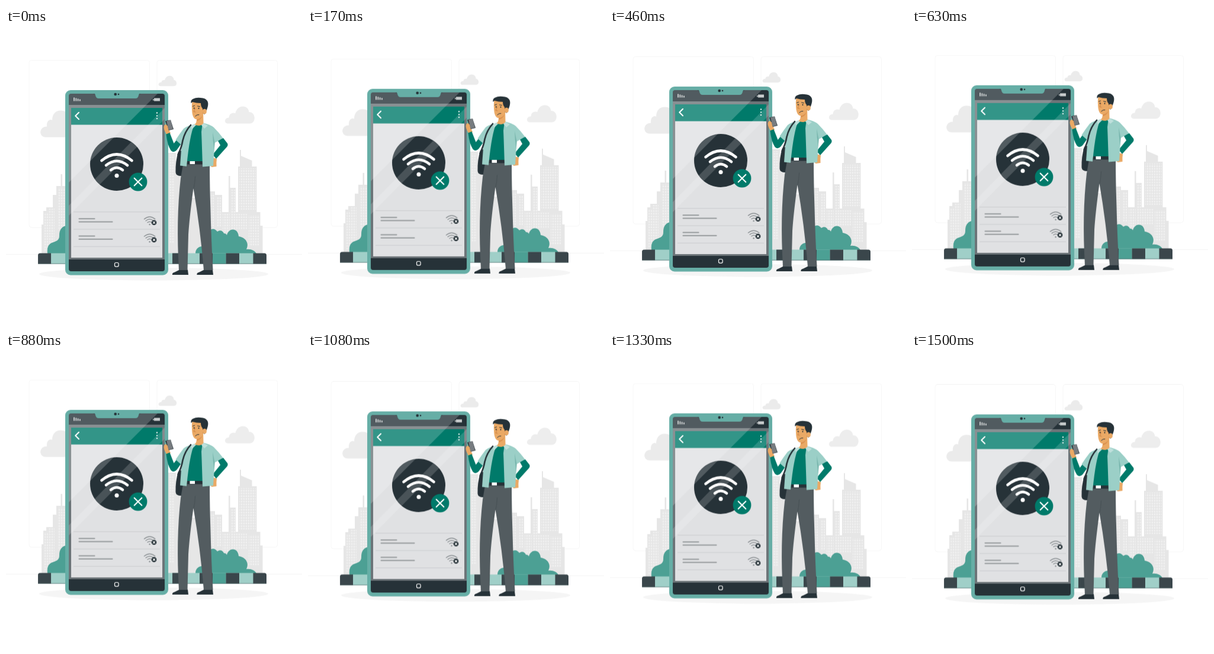
Write an HTML page that moves like this. It is 500x500 px and loops after 1.54 s.

```html
<!DOCTYPE html>
<html lang="en">
<head>
<meta charset="utf-8">
<title>No connection</title>
<style>
  html, body { margin: 0; width: 100%; height: 100%; overflow: hidden; background: #fff; }
  svg { display: block; width: 100%; height: 100%; }
  #scene { animation: float 1540ms linear -53ms infinite; }
  @keyframes float {
    0%, 100% { transform: translateY(.6px); }
    50% { transform: translateY(-9.4px); }
  }
  .line { fill: none; stroke-linecap: round; stroke-linejoin: round; }
  .ink { fill: #263238; }
  .teal { fill: #007a6a; }
  .mint { fill: #9bcfc7; }
  .bush { fill: #4ca094; }
  .skin { fill: #eaa965; }
  .city { fill: #e6e6e6; }
  .cloud { fill: #ebebeb; }
  .grey { fill: #535c60; }
</style>
</head>
<body>
<svg viewBox="0 0 500 500" xmlns="http://www.w3.org/2000/svg">
  <defs>
    <pattern id="windows" width="4" height="4.6" patternUnits="userSpaceOnUse">
      <rect x=".8" y="1" width="2.3" height="2.8" fill="#f1f1f1"/>
    </pattern>
    <clipPath id="glass"><rect x="106" y="111" width="162" height="300" rx="4"/></clipPath>
    <g id="wifi" class="line">
      <path d="M-25.5-25.5Q0-46.5 25.5-25.5M-18-17.5Q0-32 18-17.5M-10-9.5Q0-17.5 10-9.5"/>
      <path d="M0 0h.01" stroke-width="7"/>
    </g>
    <path id="cross" class="line" d="M-1-1 1 1M1-1-1 1" stroke="#fff"/>
    <g id="row">
      <path d="M123.5 322.3h26M123.5 327.5h56" class="line" stroke="#999d9f" stroke-width="2.1"/>
      <use href="#wifi" transform="translate(242.6 332) scale(.36)" stroke="#92979a" stroke-width="4"/>
      <circle class="ink" cx="250" cy="328.7" r="4.3"/>
      <use href="#cross" transform="translate(250 328.7) scale(1.6)" stroke-width=".7"/>
    </g>
  </defs>

  <g id="scene">
    <!-- backdrop -->
    <g fill="none" stroke="#f6f6f6">
      <rect x="39" y="54.5" width="203.5" height="282.5" rx="4"/>
      <rect x="255" y="54.5" width="203.5" height="282.5" rx="4"/>
      <path d="M0 382.5H500" stroke="#efefef" stroke-width=".6"/>
    </g>
    <g class="cloud">
      <path d="M261 98.3c-5 0-4.500-6.500 1.500-6.500 0-3 3-4.500 5.500-3.500 1-4 4-7.500 8.500-7.500 4 0 7 3 7 7 6 1 6.500 10.500 0 10.500z"/>
      <path opacity=".9" d="M375 161.500c-7 0-7-9.500 1.500-10 0-6.500 6-9.500 11-7.500 1-6 6-11.500 12.500-11.500 6 0 10 4 10.500 9.500 12 0 12.500 19.500 1 19.500z"/>
      <path d="M67 184.500c-12 0-12-18 2-18-1-10 5-13 9-11 0-12 8-17 15-16 7 0 12 4 14 9v36z"/>
    </g>

    <!-- skyline -->
    <g id="city">
      <path class="city" d="M60 381V332h3V309h5V303h11V282h6V267h7.500V247h2.500V267h14V381z
        M270 381V211h17v16h12v60h46V276h8v6h12v29h11V250h2.500v20h9.500v41h4V234h3V206h2v10l18.500 8v10h8v77h6v23h4v47z"/>
      <path fill="url(#windows)" d="M65 312h17v66h-17zM71 305h11v8h-11zM87 270h13v72H87zM275 214h10v150h-10z
        M346 279h6v60h-6zM355 285h9v50h-9zM379 273h8v40h-8zM394 237h28v70h-28zM380 314h28v26h-28zM410 316h18v52h-18zM366 314h12v30h-12z"/>
    </g>

    <!-- bushes, kerb, shadow -->
    <path class="bush" d="M70 381c-1-10 1-15 7-18 8-3 13-4 13-12 0-9 3-15 11-17h6v47z
      M320 381c0-7 4-11 10-12 9-1 10-9 11-18 2-14 11-14 16-7 4-3 9-2 11 3 3 0 4 1 5 3 3-13 19-13 20 2 13 2 18 13 13 22 8-1 14 2 17 7z"/>
    <ellipse cx="249.500" cy="415.700" rx="193.500" ry="10.700" fill="#f5f5f5"/>
    <g>
      <path fill="#a0cfc8" d="M76 380.500h35v18H76zM270 380.500h148v18H270z"/>
      <path class="bush" d="M349 380.500h22.500v18H349z"/>
      <path fill="#3a464b" d="M54 398.500v-14.500q0-3.500 3.500-3.500H76v18zM281 380.500h23v18h-23zM327 380.500h22v18h-22z
        M371.500 380.500H394v18h-22.500zM417.500 380.500h19q3.500 0 3.500 3.500v14.500h-22.500z"/>
      <path d="M54 398.200H440" stroke="#3f5a5b" stroke-width=".6"/>
    </g>

    <!-- large phone -->
    <rect x="100" y="105" width="174" height="312.500" rx="9" fill="#66aea6"/>
    <g clip-path="url(#glass)">
      <path class="ink" d="M106 111h162v300H106z"/>
      <path fill="#6c7478" d="M106 130h162v261H106z"/>
      <path fill="#e0e1e3" d="M110 163h154v225H110z"/>
      <path class="teal" d="M110 135h154v28.500H110z"/>
      <path fill="#66aea6" d="M147 110q3.500.5 4 4 1 5 5 5h63q4 0 5-5 .5-3.500 4-4z"/>
    </g>
    <circle class="ink" cx="184.700" cy="112" r="2.300"/>
    <circle class="ink" cx="190" cy="112" r="1.300"/>
    <circle class="ink" cx="187" cy="230" r="45"/>
    <g clip-path="url(#glass)" fill="#fff">
      <path opacity=".2" d="M106 130V111h41q3.500 0 4 3 1 5 5 5h63q4 0 5-5 .5-3 4-3h28L106 261z"/>
      <path opacity=".16" d="M268 135 106 300v17L268 154z"/>
    </g>
    <path fill="#c9cdce" d="M114 117.500h2v6h-2zM117.300 118.500h2v5h-2zM120.600 119.500h2v4h-2zM123.900 120.500h2v3h-2zM248 120h1.500v2.500H248zM250 118.500h10v5h-10z"/>
    <path class="line" d="M123 142.800l-5.800 5.700 5.800 5.700" stroke="#fff" stroke-width="2"/>
    <path class="line" d="M255 143.500h.01M255 148.300h.01M255 153.100h.01" stroke="#fff" stroke-width="2.300"/>
    <use href="#wifi" transform="translate(187 249.500)" stroke="#fff" stroke-width="4.600"/>
    <circle class="teal" cx="223" cy="260" r="15.400"/>
    <use href="#cross" transform="translate(223 260) scale(6.300)" stroke-width=".33"/>
    <path d="M114 310.800H260M114 340H260M114 369.300H260" stroke="#c9cbcd" stroke-width=".9"/>
    <use href="#row"/>
    <use href="#row" y="29.200"/>
    <rect x="183.500" y="396.500" width="6.600" height="6.600" rx="2" fill="none" stroke="#fff" stroke-width="1.200"/>

    <!-- man: bag, legs -->
    <path class="ink" d="M291 209q-5 16-4.500 35 .5 6 9.500 6h5v-45z"/>
    <path class="ink" d="M281 417q-1-3.500 4-4.500l8-4h14l1 8.500zM322.500 417q-1-3.500 4-4.500l8-4h14.500l1 8.500z"/>
    <path class="grey" d="M299 230h45q0 36 1.500 80 1 45 4 99h-15.500q-6-72-17.500-138-7 52-8.500 78l-1.500 60h-14.500q-5-85 3-155z"/>
    <path d="M317 271q2-9 2.500-20" class="line" stroke="#454e52" stroke-width=".8"/>

    <!-- arms -->
    <path class="skin" d="M272 181q-5-7-5.500-13 .5-5 4-5 4 3 4.500 8l3 7z"/>
    <path class="ink" d="M269 157.500q4-2 9-2l5 15.500-8 2z"/>
    <path fill="#777c80" d="M271 157l7-1.500 4 15-7.500 2z"/>
    <path class="skin" d="M267 165q3-2 6 .5l1 5q-3 4-6 2z"/>
    <path class="teal" d="M270.500 179.500l6-2.500 7 18 7-9 8 6-10 14q-5 6-10 1-6-9-8-27.500z"/>
    <path class="skin" d="M349 219l7 2q-1 6-.5 13l-8 1-4-4q-1-6 5.500-12z"/>
    <path class="teal" d="M357 189l10-3 7 9q1.500 3-1 6l-18 20-6-7 13-16z"/>

    <!-- torso -->
    <path class="teal" d="M312 165l20-2 4 40-3 24H303z"/>
    <path class="ink" d="M302 225h30v5.500h-30z"/>
    <path fill="#fff" d="M310.500 225h8.500v5h-8.500z"/>
    <path class="mint" d="M318 163q-12 2-18 7-7 9-13.500 19l10 9-2.500 34.500 11 1.200q3-30 6-45 3-16 7-25.700z"/>
    <path class="mint" d="M332 160q13 3 19 8 9 9 15.500 18l-14 8-2.500 39-18 1.500q-1-34-2-59z"/>
    <path fill="#78b6ad" d="M349 176l3.500 18-.8 13q-2.500-16-2.700-31z"/>
    <path fill="#bfe0dc" d="M318 162l-6 3 2 6 7-7zM332 160l9 5-6 5-5-6z"/>
    <path class="line" d="M312 164q-10 11-13.500 26-2 12-8 24" stroke="#263238" stroke-width="2.600"/>

    <!-- head -->
    <path class="skin" d="M322 150l11-9 .5 20q-6 7-15 2 4-2 3.500-13z"/>
    <path fill="#d98f4d" d="M322 153q6 0 10-6-2 8-9.500 10z"/>
    <path class="skin" d="M314.500 124q-1 8-.5 12 0 18 8.500 18.500 7-1 11-9.500l1-21z"/>
    <path class="ink" d="M312.500 127q-1-5 3-7 6-3 13-2 9 0 12 6 2 5-1 13l-4 9-3-2-.5-8q-3-3-3-9-8 0-14-2z"/>
    <ellipse class="skin" cx="335.300" cy="141" rx="3.500" ry="4.200"/>
    <ellipse class="ink" cx="317.700" cy="135.500" rx=".9" ry="1.300"/>
    <ellipse class="ink" cx="325.500" cy="135.800" rx=".9" ry="1.300"/>
    <path class="line" d="M315.500 132.300l3-1M323.500 132l4 .8M319.800 149q2.500-3 6-2.500" stroke="#263238" stroke-width="1"/>
    <path class="line" d="M319.500 135.500l-2.500 6 3 .4" stroke="#c77a3c" stroke-width=".8"/>
  </g>
</svg>
</body>
</html>
```
